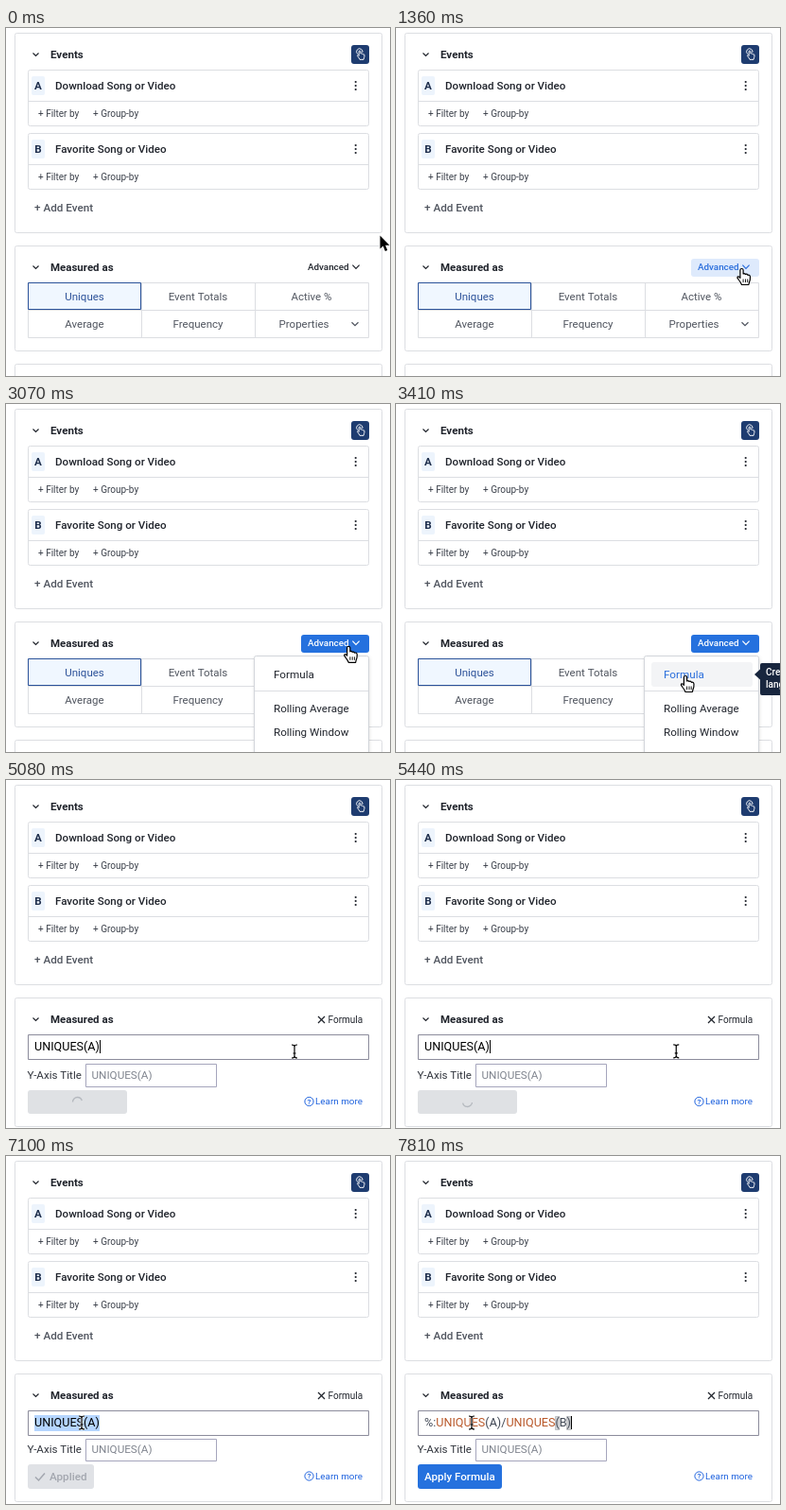
Write an HTML page with a canvas that moves like this. It is 406 px wide and 368 px high and loops after 8 s.

```html
<!DOCTYPE html>
<html lang="en">
<head>
<meta charset="utf-8">
<title>Formula builder</title>
<style>
html, body { margin: 0; width: 100%; height: 100%; overflow: hidden; background: #fff; }
canvas { display: block; width: 406px; height: 368px; }
</style>
</head>
<body>
<canvas id="stage"></canvas>
<script>
const W = 406, H = 368, LOOP = 8000;
const canvas = document.getElementById('stage');
const ctx = canvas.getContext('2d');
const ratio = window.devicePixelRatio || 1;
canvas.width = W * ratio;
canvas.height = H * ratio;

const INK = '#20242c', GREY = '#50555f', LINE = '#dcdee2', BLUE = [37, 113, 222];

const HAND = new Path2D('M-1.6 1.4Q-1.6 0 0 0Q1.6 0 1.6 1.4L1.6 5.5Q2.8 4.6 4 6Q5.4 5.2 6.4 6.8' +
  'Q8.8 6.2 9 8.8L8.8 12Q8 14 7.4 17L0 17Q-.8 14.8-3 12L-4.6 9.6Q-4.4 7.6-2.4 8.8L-1.6 9.8Z');
const ARROW = new Path2D('M0 0L0 14L3.2 11.1L5.4 16.5L7.8 15.5L5.6 10.2L10 10.2Z');
const IBEAM = new Path2D('M-3-7Q0-7 0-5Q0-7 3-7M0-5V5M-3 7Q0 7 0 5Q0 7 3 7M-1.5 2H1.5');

const progress = (t, a, b) => Math.min(1, Math.max(0, (t - a) / (b - a)));
const ease = p => p < .5 ? 4 * p * p * p : 1 - Math.pow(2 - 2 * p, 3) / 2;
const lerp = (a, b, p) => a + (b - a) * p;
const mix = (a, b, p) => `rgb(${a.map((v, i) => Math.round(lerp(v, b[i], p))).join()})`;
const between = (t, a, b) => t >= a && t < b;

function setFont(size, weight = 400) {
  ctx.font = `${weight} ${size}px Roboto, sans-serif`;
}

function text(str, x, y, size = 11.6, color = INK, weight = 400, align = 'left') {
  setFont(size, weight);
  ctx.fillStyle = color;
  ctx.textAlign = align;
  ctx.fillText(str, x, y);
}

function box(x, y, w, h, fill, stroke, r = 0) {
  ctx.beginPath();
  ctx.roundRect(x, y, w, h, r);
  if (fill) { ctx.fillStyle = fill; ctx.fill(); }
  if (stroke) { ctx.strokeStyle = stroke; ctx.lineWidth = 1; ctx.stroke(); }
}

function line(points, color, width = 1) {
  ctx.beginPath();
  points.forEach(([x, y]) => ctx.lineTo(x, y));
  ctx.strokeStyle = color;
  ctx.lineWidth = width;
  ctx.stroke();
}

function circle(x, y, r) {
  ctx.beginPath();
  ctx.arc(x, y, r, 0, Math.PI * 2);
}

function chevron(x, y, r, color) {
  line([[x - r, y - r / 2], [x, y + r / 2], [x + r, y - r / 2]], color, 1.2);
}

function eventRow(y, letter, name) {
  box(23.5, y + .5, 360, 59, '#fff', LINE, 2);
  line([[24, y + 33.5], [383, y + 33.5]], LINE);
  box(27, y + 7, 14, 20, '#edf4fc', null, 2);
  text(letter, 34, y + 21, 11.6, '#1f2f4d', 600, 'center');
  text(name, 52, y + 21, 11.6, INK, 500);
  ctx.fillStyle = INK;
  for (const d of [13, 17, 21]) {
    circle(369.7, y + d, 1.1);
    ctx.fill();
  }
  text('+ Filter by', 34, y + 49.5, 10, '#3c414b');
  text('+ Group-by', 92, y + 49.5, 10, '#3c414b');
}

function clickIcon() {
  box(365, 18, 19, 20, '#1e3c70', null, 3);
  ctx.strokeStyle = '#fff';
  ctx.save();
  ctx.translate(374, 24);
  ctx.scale(.55, .55);
  ctx.lineWidth = 1.7;
  ctx.stroke(HAND);
  ctx.restore();
  ctx.beginPath();
  ctx.arc(373.8, 25, 3.2, Math.PI * .7, Math.PI * 2.1);
  ctx.lineWidth = .9;
  ctx.stroke();
}

function eventsCard() {
  box(9.5, 5.5, 388, 211, '#fff', LINE, 2);
  chevron(31.5, 28, 3, INK);
  text('Events', 47, 32, 11.6, INK, 600);
  clickIcon();
  eventRow(44, 'A', 'Download Song or Video');
  eventRow(111, 'B', 'Favorite Song or Video');
  text('+ Add Event', 30, 194, 11.7, GREY, 500);
}

function measureHeader(bottom) {
  box(9.5, 230.5, 388, bottom - 230.5, '#fff', LINE, 2);
  chevron(31.5, 253, 3, INK);
  text('Measured as', 47, 257, 11.5, INK, 600);
}

function metricGrid() {
  const cells = ['Uniques', 'Event Totals', 'Active %', 'Average', 'Frequency', 'Properties'];
  box(23.5, 269.5, 360, 58, '#fff', LINE);
  line([[24, 298.5], [383, 298.5]], LINE);
  for (const x of [143.5, 263.5]) line([[x, 270], [x, 327]], LINE);
  box(23.5, 269.5, 119, 28, '#f0f7ff', '#2b5299');
  cells.forEach((name, i) => {
    const x = 83 + (i % 3) * 120 - (i === 5 ? 8 : 0);
    text(name, x, i < 3 ? 288 : 317, 11.5, i ? GREY : '#2d5299', 400, 'center');
  });
  chevron(369, 313, 3.5, GREY);
}

function advancedButton(t, hover) {
  const light = [222, 234, 252], pressed = [200, 218, 245], open = [137, 160, 200];
  let fill = null, ink = INK;
  if (t >= 2360) { fill = mix(BLUE, BLUE, 0); ink = '#fff'; }
  else if (t >= 2300) { fill = mix(open, open, 0); ink = '#7f9bcb'; }
  else if (t >= 2080) { fill = mix(light, pressed, progress(t, 2040, 2130)); ink = '#2a6edc'; }
  else if (hover) { fill = mix([255, 255, 255], light, progress(t, 1180, 1340)); ink = '#2a6edc'; }
  if (fill) box(312, 244, 72, 19, fill, null, 3);
  text('Advanced', 319, 256, 9.8, ink, 500);
  chevron(370, 252.5, 3.6, ink);
}

function menu(t, hover) {
  ctx.save();
  ctx.shadowColor = 'rgba(0,0,0,.16)';
  ctx.shadowBlur = 4 * ratio;
  ctx.shadowOffsetY = ratio;
  box(262.5, 266.5, 121, 130, '#fff');
  ctx.restore();
  box(262.5, 266.5, 121, 130, null, '#d3d6db', 2);
  if (hover) box(270, 273, 107, 26, '#f3f4f6', null, 3);
  line([[263, 303.5], [383, 303.5]], LINE);
  text('Formula', 283, 290, 11.7, hover ? '#2a6edc' : INK);
  text('Rolling Average', 283, 326, 11.6);
  text('Rolling Window', 283, 351, 11.6);
  const shown = progress(t, 3280, 3400);
  if (!shown) return;
  ctx.globalAlpha = shown;
  box(385, 274, 60, 34, '#18263e', null, 2);
  ctx.beginPath();
  ctx.moveTo(379, 286);
  ctx.lineTo(385, 280.5);
  ctx.lineTo(385, 291.5);
  ctx.fill();
  text('Create', 391, 287, 10, '#fff', 500);
  text('language', 391, 299.5, 10, '#fff', 500);
  ctx.globalAlpha = 1;
}

// Draws coloured runs one after another.
function runs(parts, x, y, size) {
  for (const [str, color] of parts) {
    text(str, x, y, size, color);
    x += ctx.measureText(str).width;
  }
}

function formulaField(t) {
  const size = 12.6, left = 30, base = 286;
  const pasted = t >= 7580;
  const content = pasted ? '%:UNIQUES(A)/UNIQUES(B)' : 'UNIQUES(A)';
  const at = n => { setFont(size); return left + ctx.measureText(content.slice(0, n)).width; };
  const end = content.length;

  box(23.5, 269.5, 360, 26, '#fff', '#8c8c9c');

  const brackets = between(t, 6150, 6210) || pasted;
  let caret = end, marked = 0;
  if (between(t, 6210, 6330)) caret = 7;
  else if (between(t, 6330, 6510)) caret = marked = 7;
  else if (between(t, 6510, 7580)) marked = end;

  if (marked) box(left, 274, at(marked) - left, 17, '#b5d5ff');
  if (brackets) {
    for (const i of [end - 3, end - 1]) box(at(i), 275.5, at(i + 1) - at(i), 14, '#d2d4d6', '#c0c2c5');
  }
  const dark = pasted ? '#414855' : '#000', word = '#b9592b';
  const parts = pasted
    ? [['%:', dark], ['UNIQUES', word], ['(A)/', dark], ['UNIQUES', word], ['(B)', dark]]
    : [[content, dark]];
  runs(parts, left, base, size);
  if (!between(t, 7100, 7580)) {
    ctx.fillStyle = '#000';
    ctx.fillRect(Math.round(at(caret)), 275, 1, 14);
  }
}

function formulaButton(t, loading) {
  if (loading) {
    box(23, 328, 105, 25, '#dfe1e4', null, 3);
    const a = -Math.PI + (t - 5080) / 700 * Math.PI * 2;
    ctx.beginPath();
    ctx.arc(75.5, 340.5, 5, a, a + Math.PI * .9);
    ctx.strokeStyle = '#b4b8be';
    ctx.lineWidth = 1.3;
    ctx.stroke();
  } else if (t < 7580) {
    const faded = '#a3a7af';
    box(23, 326, 70, 26, '#e0e2e6', null, 3);
    line([[31, 339.5], [34.5, 343], [41, 335.5]], faded, 1.5);
    text('Applied', 46, 343, 11.7, faded, 500);
  } else {
    box(23, 326, 89, 26, mix([224, 226, 230], BLUE, progress(t, 7540, 7800)), null, 3);
    text('Apply Formula', 30, 343, 11.6, '#fff', 500);
  }
}

function formulaPanel(t) {
  const loading = t < 5480, drop = loading ? 1 : 0;
  measureHeader(365.5 + drop);
  line([[330, 250], [337, 257]], INK, 1.2);
  line([[337, 250], [330, 257]], INK, 1.2);
  text('Formula', 340.5, 256.5, 10);
  formulaField(t);
  text('Y-Axis Title', 22.5, 314 + drop * 2, 11.6, '#30343c');
  box(84.5, 299.5 + drop, 138, 23 + drop, '#fff', '#a5a5bc');
  text('UNIQUES(A)', 90.5, 314 + drop * 2, 11.7, '#7f848e');
  formulaButton(t, loading);
  const link = '#1e62de', y = 338.5 + drop * 1.5;
  circle(320.5, y, 4.6);
  ctx.strokeStyle = link;
  ctx.lineWidth = 1;
  ctx.stroke();
  text('?', 320.5, y + 2.8, 8, link, 500, 'center');
  text('Learn more', 327, y + 3.2, 9.9, link);
}

function pointer(t) {
  const toButton = ease(progress(t, 930, 1310));
  const toItem = ease(progress(t, 2980, 3360));
  const toField = ease(progress(t, 5330, 5850));
  if (t >= 5080) return { x: lerp(305, 80, toField), y: lerp(287, 282, toField) };
  if (t >= 2500) return { x: lerp(365.5, 306, toItem), y: lerp(254.5, 287.5, toItem) };
  return { x: lerp(395.5, 365.5, toButton), y: lerp(219.5, 254.5, toButton) };
}

function drawPointer(t, p, hover) {
  ctx.save();
  ctx.translate(p.x, p.y);
  ctx.lineJoin = 'round';
  if (t >= 5080) {
    ctx.strokeStyle = '#fff';
    ctx.lineWidth = 2.6;
    ctx.stroke(IBEAM);
    ctx.strokeStyle = '#000';
    ctx.lineWidth = 1.2;
    ctx.stroke(IBEAM);
  } else if (hover || t >= 2080) {
    ctx.fillStyle = '#fff';
    ctx.fill(HAND);
    ctx.strokeStyle = '#000';
    ctx.lineWidth = 1.2;
    ctx.stroke(HAND);
    for (const x of [1.6, 4, 6.2]) line([[x, 11], [x, 14.5]], '#000', .9);
  } else {
    ctx.strokeStyle = '#fff';
    ctx.lineWidth = 2;
    ctx.stroke(ARROW);
    ctx.fillStyle = '#000';
    ctx.fill(ARROW);
  }
  ctx.restore();
}

function draw(t) {
  ctx.setTransform(ratio, 0, 0, ratio, 0, 0);
  ctx.fillStyle = '#fff';
  ctx.fillRect(0, 0, W, H);
  const p = pointer(t);
  const overButton = p.x < 384 && between(p.y, 244, 263);
  const overItem = p.x < 377 && between(p.y, 273, 299);
  eventsCard();
  if (t < 5080) {
    measureHeader(341.5);
    box(9.5, 355.5, 388, 40, '#fff', LINE, 2);
    metricGrid();
    advancedButton(t, overButton);
    if (t >= 2300) menu(t, overItem);
  } else {
    formulaPanel(t);
  }
  drawPointer(t, p, overButton || overItem);
}

const start = performance.now();
function tick() {
  draw((performance.now() - start) % LOOP);
  requestAnimationFrame(tick);
}
tick();
</script>
</body>
</html>
```
